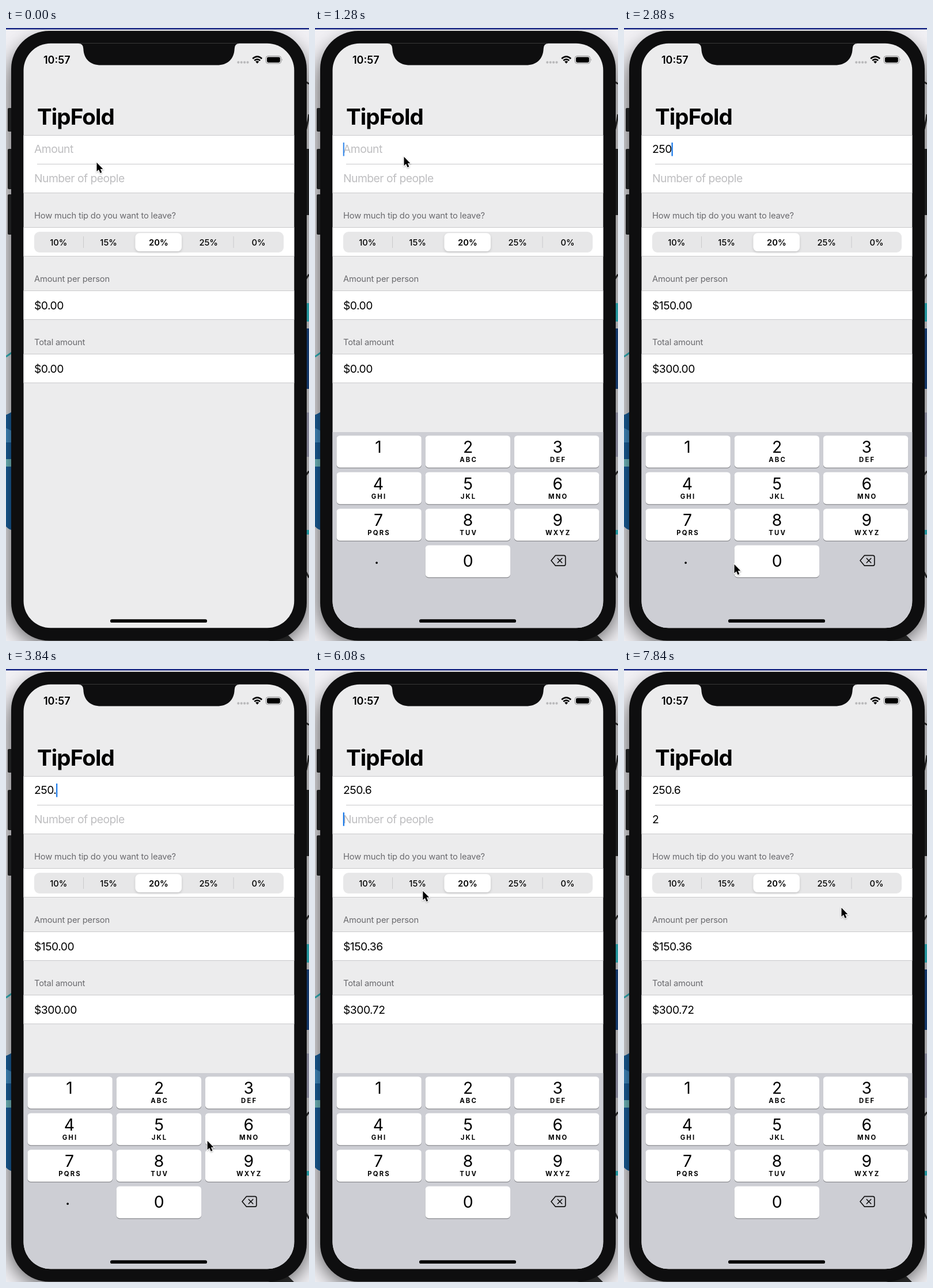
Recreate the animation shown at these times as an HTML page. Size 526 by 1065 pixels, loop 8000 ms.

```html
<!DOCTYPE html>
<html lang="en">
<head>
<meta charset="utf-8">
<title>Tip calculator</title>
<style>
  html, body { margin: 0; width: 100%; height: 100%; overflow: hidden; background: #c6c6c8; }
  svg { display: block; width: 100%; height: 100%; font-family: Inter, "Open Sans", sans-serif; }
  text { white-space: pre; }
  .title { font-size: 38.5px; font-weight: 700; letter-spacing: -.9px; }
  .clock { font-size: 18px; font-weight: 600; }
  .cell { font-size: 19.3px; letter-spacing: -.52px; }
  .hint { fill: #bebec0; }
  .head { font-size: 14.73px; letter-spacing: -.17px; fill: #6a6a6e; }
  .seg { font-size: 14.7px; font-weight: 500; text-anchor: middle; }
  .seg.on { font-weight: 600; }
  .digit { font-size: 28.3px; text-anchor: middle; }
  .abc { font-size: 11.3px; font-weight: 700; letter-spacing: 2.2px; text-anchor: middle; }
  .line { stroke: #c9c9cb; }
</style>
</head>
<body>
<svg viewBox="0 0 526 1065">
  <defs>
    <clipPath id="screen"><rect x="30.5" y="26.7" width="469.8" height="1015.6" rx="47"/></clipPath>
    <filter id="glow" x="-20%" y="-10%" width="140%" height="120%"><feGaussianBlur stdDeviation="17"/></filter>
    <filter id="soft" x="-20%" y="-30%" width="140%" height="170%">
      <feDropShadow dx="0" dy="2" stdDeviation="2" flood-opacity=".16"/>
    </filter>
    <filter id="drop" x="-50%" y="-50%" width="200%" height="200%">
      <feDropShadow dx="0" dy="1" stdDeviation="1" flood-opacity=".35"/>
    </filter>
  </defs>

  <!-- desktop -->
  <rect width="526" height="1065" fill="#f1f0f4"/>
  <path d="M0 571L10 564" stroke="#35c5cf" stroke-width="3"/>
  <path d="M0 672Q6 670 14 664V873Q5 872 0 866Z" fill="#1d69ab"/>
  <path d="M0 695L10 700V720H0Z" fill="#4a9bd8"/>
  <path d="M0 749H10V762H0Z" fill="#7fd0d6"/>
  <path d="M518 92L526 97M518 184Q523 172 526 150M518 440L526 428M518 780L526 770M518 940L526 955" stroke="#333" stroke-width="3" fill="none"/>
  <path d="M518 478H526V510H518ZM518 872H526V880H518Z" fill="#35d5e0"/>
  <path d="M518 522H526V627H518Z" fill="#1d4f96"/>
  <path d="M518 668H526V745H518Z" fill="#b9b9d2"/>
  <path d="M455 1065L490 1055L500 1065Z" fill="#333"/>
  <rect x="6" y="22" width="518" height="1050" rx="70" opacity=".62" filter="url(#glow)"/>
  <rect width="526" height="2.5" fill="#1b2a86"/>

  <!-- phone -->
  <g fill="#1d1e1f">
    <rect x="3" y="139" width="12" height="41" rx="2"/>
    <rect x="3" y="210" width="12" height="70" rx="2"/>
    <rect x="3" y="289" width="12" height="70" rx="2"/>
    <rect x="514" y="210" width="14" height="115" rx="2"/>
  </g>
  <rect x="9" y="5" width="513" height="1059.5" rx="66" fill="#0e0e0f"/>

  <g clip-path="url(#screen)">
    <rect x="30" y="26" width="471" height="1017" fill="#ececed"/>
    <path d="M126 26V27Q134 27 134.3 36C135 54 146 64.6 165 64.6H366C385 64.6 396 54 396.7 36Q397 27 405 27V26Z" fill="#0e0e0f"/>
    <text class="clock" x="65" y="62">10:57</text>
    <g fill="#b9b9bb">
      <circle cx="403.3" cy="59.7" r="2.1"/><circle cx="408.7" cy="59.7" r="2.1"/>
      <circle cx="414.1" cy="59.7" r="2.1"/><circle cx="419.5" cy="59.7" r="2.1"/>
    </g>
    <path d="M428.2 53.2Q436.2 46 444.2 53.2M431.2 56.6Q436.2 52.2 441.2 56.6" fill="none" stroke="#000" stroke-width="2.6"/>
    <path d="M433.2 58.6Q436.2 56 439.2 58.6L436.2 61.8Z"/>
    <rect x="451.2" y="48.7" width="26.4" height="13" rx="3.8" fill="none" stroke="#8a8a8c"/>
    <rect x="453" y="50.5" width="22.8" height="9.4" rx="2.3"/>
    <path d="M479 53Q480.8 55.2 479 57.4Z" fill="#8a8a8c"/>
    <text class="title" x="54" y="168">TipFold</text>

    <g id="form"></g>
    <rect id="caret" width="2.2" height="23.5" fill="#1274e8"/>

    <g id="pad">
      <rect x="30" y="702" width="471" height="342" fill="#cdced4"/>
      <g id="keys"></g>
      <g fill="none" stroke="#111" stroke-width="1.7" stroke-linejoin="round" stroke-linecap="round">
        <path d="M417.5 916.3H432Q434.8 916.3 434.8 919V931.5Q434.8 934.2 432 934.2H417.5L410 925.3Z"/>
        <path d="M421.3 921.5L428.7 929M428.7 921.5L421.3 929"/>
      </g>
    </g>
    <rect x="181" y="1027.3" width="168" height="5.7" rx="2.85"/>
  </g>

  <g id="mouse">
    <g id="ring" fill="none">
      <circle r="24.5" cx="-1" cy=".5" stroke="#fff" stroke-opacity=".35" stroke-width="3"/>
      <circle r="24.5" cx="-1" cy=".5" stroke="#0b0b0b" stroke-width="1.5"/>
    </g>
    <path d="M-.5 -.3V15.3L3 12L5.6 18L8.3 16.8L5.8 10.9H10.3Z" stroke="#fff" stroke-width="2" paint-order="stroke" filter="url(#drop)"/>
  </g>
</svg>

<script>
const LOOP = 8000, TICK = 160;
const $ = id => document.getElementById(id);

function add(parent, tag, attrs, text = '') {
  const el = document.createElementNS('http://www.w3.org/2000/svg', tag);
  for (const k in attrs) el.setAttribute(k, attrs[k]);
  el.textContent = text;
  return parent.appendChild(el);
}
const form = $('form');
const label = (cls, x, y, text, parent = form) => add(parent, 'text', { class: cls, x, y }, text);
const rule = (y, x = 30) => add(form, 'path', { class: 'line', d: `M${x} ${y}H501` });

function band(y, h) {
  add(form, 'rect', { x: 30, y, width: 471, height: h, fill: '#fff' });
  rule(y);
  rule(y + h);
}

// Form rows
band(186.5, 100);
rule(236.5, 54);
band(346.5, 50);
band(456.5, 50);
band(566.5, 50);
label('head', 49, 331.3, 'How much tip do you want to leave?');
label('head', 49, 441.3, 'Amount per person');
label('head', 49, 551.3, 'Total amount');
const fields = [label('cell', 49, 217.3), label('cell', 49, 267.5)];
const hints = ['Amount', 'Number of people'];
const share = label('cell', 49, 489);
const total = label('cell', 49, 599);

// Tip picker
add(form, 'rect', { x: 49, y: 354, width: 433, height: 36, rx: 9, fill: '#e7e7e8' });
add(form, 'rect', { x: 224.5, y: 356.3, width: 80.5, height: 31.7, rx: 7.5, fill: '#fff', filter: 'url(#soft)' });
add(form, 'path', { class: 'line', d: 'M134.5 362V382M395 362V382' });
['10%', '15%', '20%', '25%', '0%'].forEach((s, i) =>
  label(i === 2 ? 'seg on' : 'seg', 91.3 + i * 86.8, 377.5, s));

// Keypad
const keys = {};
const groups = ['', 'ABC', 'DEF', 'GHI', 'JKL', 'MNO', 'PQRS', 'TUV', 'WXYZ'];
function addKey(name, col, row, sub) {
  const y = 708.2 + row * 63.5, mid = 110 + col * 155.6;
  const box = { x: 37.5 + col * 154.2, width: 147.3, height: 55.5, rx: 5.5 };
  const dot = name === '.';
  if (!dot) add($('keys'), 'rect', { ...box, y: y + 1.2, fill: '#898a8e' });
  keys[name] = add($('keys'), 'rect', { ...box, y, fill: dot ? 'none' : '#fff' });
  if (sub) label('abc', mid + 1, y + 45.8, sub, $('keys'));
  return label('digit', dot ? 107 : mid, y + (dot ? 32 : sub || row < 3 ? 29.8 : 37), name, $('keys'));
}
groups.forEach((sub, i) => addKey(String(i + 1), i % 3, Math.floor(i / 3), sub));
addKey('0', 1, 3);
const dotLabel = addKey('.', 0, 3);

// Release time of each tap and what it hits
const taps = [
  [650, 'field0'], [2130, '2'], [2450, '5'], [2730, '0'],
  [3250, '.'], [4150, '6'], [5650, 'field1'], [6900, '2']
];

// Pointer stops: time, x, y
const stops = [
  [0, 158, 234], [320, 158, 234], [480, 155, 222], [1280, 155, 224],
  [2000, 262, 735], [2130, 262, 736], [2400, 260, 800], [2720, 235, 925],
  [2880, 192, 932], [3200, 108, 928], [3360, 108, 928], [4000, 395, 800],
  [4160, 395, 800], [4740, 148, 294], [5280, 148, 293], [5600, 150, 262],
  [5760, 150, 262], [6720, 296, 740], [7520, 296, 740], [7840, 378, 415]
];

function pointerAt(t) {
  const i = stops.findIndex(s => s[0] > t);
  if (i < 0) return stops[stops.length - 1].slice(1);
  const [a, b] = [stops[i - 1], stops[i]];
  const u = (t - a[0]) / (b[0] - a[0]), e = u * u * (3 - 2 * u);
  return [a[1] + (b[1] - a[1]) * e, a[2] + (b[2] - a[2]) * e];
}

// Critically damped spring
function padOffset(t) {
  if (t >= 1280) return 0;
  const w = Math.max(0, t - 720) / 79.5;
  return 342 * (1 + w) * Math.exp(-w);
}

function caretAlpha(age) {
  const p = age % 1180;
  return Math.min(1, Math.max(0, (850 - p) / 270));
}

const money = v => '$' + v.toFixed(2);

function draw(t) {
  const values = ['', ''];
  let focus = -1, last = 0, held = null;
  for (const [at, hit] of taps) {
    if (at > t) {
      if (at - t < TICK) held = hit;
      break;
    }
    last = at;
    if (hit.startsWith('field')) focus = +hit.slice(5);
    else values[focus] += hit;
  }

  fields.forEach((f, i) => {
    f.textContent = values[i] || hints[i];
    f.classList.toggle('hint', !values[i]);
  });
  const sum = (parseFloat(values[0]) || 0) * 1.2;
  share.textContent = money(sum / (+values[1] || 2));
  total.textContent = money(sum);

  const caret = $('caret');
  caret.style.opacity = focus < 0 ? 0 : caretAlpha(t - last);
  if (focus >= 0) {
    const w = values[focus] ? fields[focus].getComputedTextLength() : 0;
    caret.setAttribute('x', 48.7 + w);
    caret.setAttribute('y', 199 + focus * 50.2);
  }

  for (const k in keys) {
    const dot = k === '.';
    keys[k].setAttribute('fill', k === held ? (dot ? '#fff' : '#b0b8ce') : dot ? 'none' : '#fff');
  }
  dotLabel.style.opacity = focus === 1 ? 0 : 1;
  $('pad').setAttribute('transform', `translate(0 ${padOffset(t)})`);
  $('ring').style.opacity = held ? 1 : 0;
  $('mouse').setAttribute('transform', `translate(${pointerAt(t)})`);
}

function loop() {
  const t = performance.now() % LOOP;
  draw(Math.floor(t / TICK) * TICK);
  requestAnimationFrame(loop);
}
loop();
</script>
</body>
</html>
```
